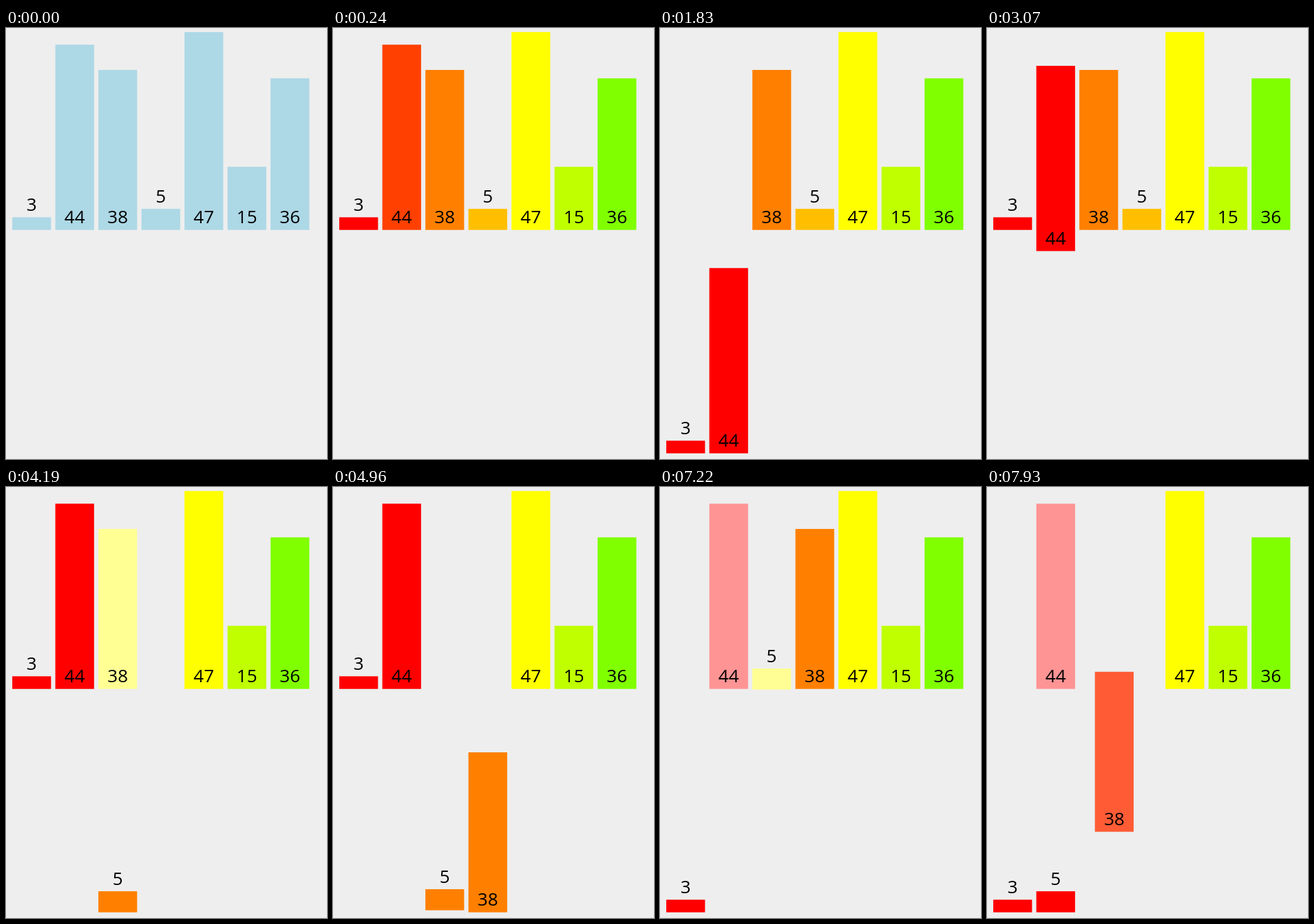
These frames come from a looping animation (466x627 px, 8000 ms). An HTML page:

```html
<!DOCTYPE html>
<html lang="en">
<head>
<meta charset="utf-8">
<title>Merge sort</title>
<style>
  html, body { margin: 0; width: 100%; height: 100%; overflow: hidden; background: #eee; }
  svg { display: block; width: 466px; height: 627px; }
  text { font: 26px "Open Sans", "Noto Sans", sans-serif; text-anchor: middle; }
</style>
</head>
<body>
<svg id="stage" viewBox="0 0 466 627"><g id="rects"></g><g id="labels"></g></svg>
<script>
const LOOP = 8000;
const LEFT = 9.1, PITCH = 62.5, WIDTH = 56.25, UNIT = 6.125;
const TOP_BASE = 293.75, DROP = 325;
const VALUES = [3, 44, 38, 5, 47, 15, 36];

const BLUE = [173, 216, 230], RED = [255, 0, 0], ORANGE = [255, 128, 0];
const HUES = [RED, [255, 64, 0], ORANGE, [255, 191, 0], [255, 255, 0], [191, 255, 0], [128, 255, 0]];
const pale = c => c.map(v => Math.min(255, v + 148));

// Each step: start, end, bar index, properties to reach (slot, row 0/1, color).
const steps = [];
const add = (start, end, bar, to) => steps.push({ start, end, bar, to });

HUES.forEach((color, i) => add(10, 240, i, { color }));

// merge 3 | 44
add(630, 790, 0, { color: pale(HUES[0]) });
add(630, 790, 1, { color: pale(HUES[1]) });
add(1122, 1410, 0, { row: 1, color: RED });
add(1530, 1830, 1, { row: 1, color: RED });
add(2155, 2510, 0, { row: 0 });
add(2850, 3160, 1, { row: 0 });

// merge 38 | 5
add(3250, 3500, 2, { color: pale(HUES[2]) });
add(3250, 3500, 3, { color: pale(HUES[3]) });
add(3815, 4165, 3, { slot: 2, row: 1, color: ORANGE });
add(4445, 4700, 2, { slot: 3, row: 1, color: ORANGE });
add(4920, 5230, 3, { row: 0 });
add(5487, 5835, 2, { row: 0 });

// merge 3 44 | 5 38
add(6180, 6350, 0, { color: pale(RED) });
add(6180, 6350, 3, { color: pale(ORANGE) });
add(6570, 6880, 0, { row: 1, color: RED });
add(6570, 6880, 1, { color: pale(RED) });
add(7190, 7540, 3, { slot: 1, row: 1, color: RED });
add(7190, 7540, 2, { color: pale(ORANGE) });
add(7760, 8070, 2, { slot: 2, row: 1, color: RED });

const make = (tag, parent) => document.getElementById(parent)
  .appendChild(document.createElementNS("http://www.w3.org/2000/svg", tag));

const views = VALUES.map(value => {
  const rect = make("rect", "rects"), label = make("text", "labels");
  rect.setAttribute("width", WIDTH);
  rect.setAttribute("height", value * UNIT);
  label.textContent = value;
  return { rect, label };
});

const ease = t => t < 0.5 ? 4 * t ** 3 : 1 - 4 * (1 - t) ** 3;
const mix = (a, b, k) => Array.isArray(a) ? a.map((v, i) => mix(v, b[i], k)) : a + (b - a) * k;

function draw(time) {
  const bars = VALUES.map((value, slot) => ({ slot, row: 0, color: BLUE }));
  for (const { start, end, bar, to } of steps) {
    if (time <= start) continue;
    const k = ease(Math.min(1, (time - start) / (end - start)));
    for (const key in to) bars[bar][key] = mix(bars[bar][key], to[key], k);
  }
  bars.forEach(({ slot, row, color }, i) => {
    const { rect, label } = views[i];
    const height = VALUES[i] * UNIT;
    const x = LEFT + slot * PITCH, base = TOP_BASE + row * DROP;
    rect.setAttribute("x", x);
    rect.setAttribute("y", base - height);
    rect.setAttribute("fill", `rgb(${color.map(Math.round)})`);
    label.setAttribute("x", x + WIDTH / 2);
    label.setAttribute("y", base - 9.5 - (VALUES[i] < 10 ? height : 0));
  });
}

function tick() {
  draw(performance.now() % LOOP);
  requestAnimationFrame(tick);
}
tick();
</script>
</body>
</html>
```
